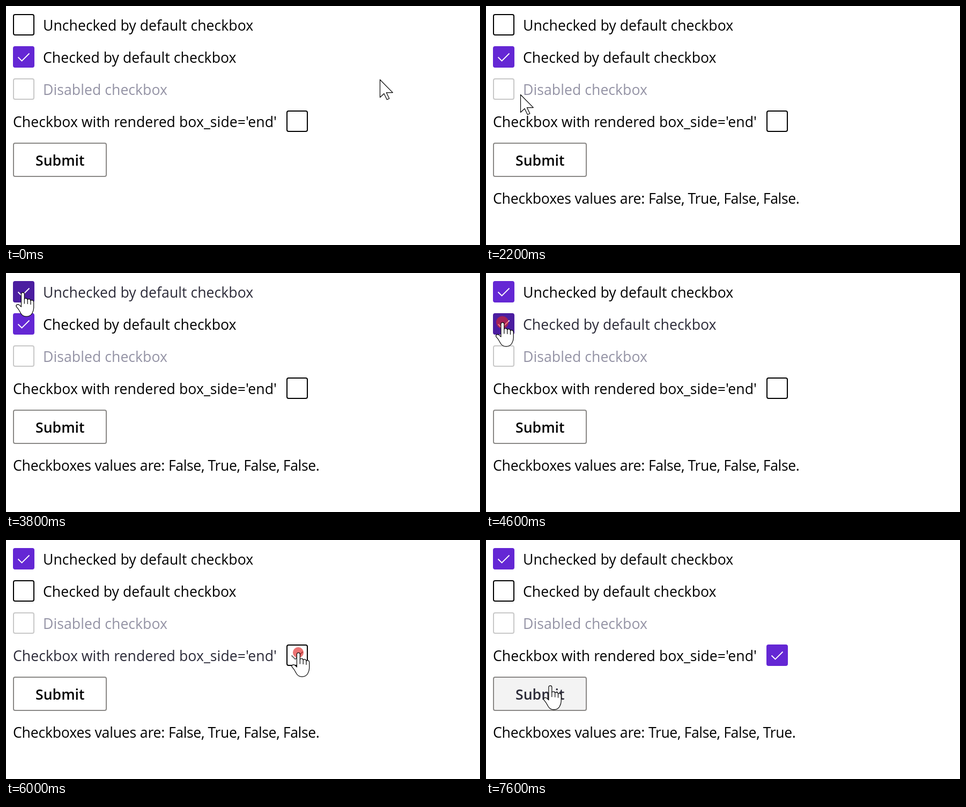
An HTML page for the animation above (8000 ms loop, 884 by 446 pixels).

```html
<!DOCTYPE html>
<html lang="en">
<head>
<meta charset="utf-8">
<title>Checkbox form</title>
<style>
  html, body { margin: 0; width: 100%; height: 100%; overflow: hidden; background: #fff; }
  svg { display: block; width: 884px; height: 446px; }
  text { font: 400 26.6px "Open Sans", "Noto Sans", sans-serif; letter-spacing: .06px; white-space: pre; }
  .box { fill: #fff; stroke: #000; stroke-width: 2; }
  .tick { fill: none; stroke: #fff; stroke-width: 1.8; visibility: hidden; }
  .on .box { fill: #6427d4; stroke: #6427d4; }
  .on .tick, .hover .tick { visibility: visible; }
  .hover .tick { stroke: #666; }
  .hover text { fill: #2b2a38; }
  .on.hover .box { fill: #4b1da0; stroke: #4b1da0; }
  .on.hover .tick { stroke: #fff; }
  .disabled .box { stroke: #c8c8c8; }
  .disabled text { fill: #9493a5; }
  #submit rect { fill: #fff; stroke: #8a8886; stroke-width: 2; }
  #submit text { font-weight: 600; letter-spacing: 0; text-anchor: middle; }
  #submit.hover rect { fill: #f3f3f3; }
  #submit.press text { fill: #000; }
  #result { letter-spacing: -.18px; }
  #values { letter-spacing: -.38px; }
  #ripple { fill: #e02424; }
  #arrow, #hand { fill: #fff; stroke: #000; stroke-width: 1.2; stroke-linejoin: round; }
</style>
</head>
<body>
<svg viewBox="0 0 884 446">
  <g class="row"><text>Unchecked by default checkbox</text></g>
  <g class="row"><text>Checked by default checkbox</text></g>
  <g class="row disabled"><text>Disabled checkbox</text></g>
  <g class="row end"><text>Checkbox with rendered box_side='end'</text></g>
  <g id="submit">
    <rect x="14" y="256" width="173" height="62" rx="3"/>
    <text x="100.8" y="298">Submit</text>
  </g>
  <text id="result" x="13" y="369">Checkboxes values are: <tspan id="values"></tspan></text>
  <circle id="ripple"/>
  <path id="arrow" d="M.5.5V33.5L8 26.5 13.5 37.8 17.8 35.8 12.4 24.6H24.3Z"/>
  <g id="hand">
    <path d="M-2.6 27V3.2C-2.6-.6 3.3-.6 3.3 3.2V13C4.5 10.3 9 10.8 9.2 14
             10.6 11.7 14.7 12.2 15 15.6 16.8 13.8 20.7 14.6 20.7 18.4V29
             C20.7 34 19 37 17.6 39.5 14.8 44 11.5 45.2 7 45.2 2 45.2 -1 43 -3.2 39.5
             L-6.8 33.2C-8.2 30.6 -10 29 -11.4 27.2 -13.6 23.8 -9.5 21.4 -6.4 23.6Z"/>
    <path fill="none" d="M3.3 13V21.5M9.2 14V22M15 15.6V23"/>
  </g>
</svg>
<script>
const LOOP = 8000, STEP = 200;    // the picture updates five times a second
const ROW = 60, LEFT = 13, TOP = 15;
const RESPONSE = 325;             // delay from a click to its effect
const SPREAD = .0575, MAX = 25;   // ripple growth per ms, largest radius

const $ = id => document.getElementById(id);
const rows = [...document.querySelectorAll('.row')];
const submit = $('submit');
const targets = [...rows.filter(row => !row.classList.contains('disabled')), submit];

const START = { x: 697, y: 137 };
const moves = [
  { from: 0, to: 800, x: 122.5, y: 283.5 },
  { from: 2000, to: 2200, x: 64, y: 165 },
  { from: 2200, to: 2600, x: 31, y: 36 },
  { from: 3800, to: 4400, x: 30.5, y: 92 },
  { from: 4800, to: 5400, x: 545, y: 210 },
  { from: 6400, to: 7000, x: 119.5, y: 271.5 }
];
const clicks = [
  { at: 1275, on: submit },
  { at: 3270, on: rows[0] },
  { at: 4400, on: rows[1] },
  { at: 5825, on: rows[3] },
  { at: 7075, on: submit }
];

rows.forEach((row, i) => {
  const y = TOP + i * ROW, end = row.classList.contains('end');
  row.firstChild.setAttribute('x', end ? LEFT : LEFT + 56);
  row.firstChild.setAttribute('y', y + 31);
  row.insertAdjacentHTML('beforeend', `
    <g transform="translate(${end ? 523 : LEFT} ${y})">
      <rect class="box" x="1" y="1" width="38" height="38" rx="3"/>
      <path class="tick" d="M9.5 20.5l7 7 14-14"/>
    </g>`);
});

function cursorAt(t) {
  let { x, y } = START;
  for (const m of moves) {
    const u = Math.min(1, Math.max(0, (t - m.from) / (m.to - m.from)));
    const k = u * u * (3 - 2 * u);
    x += (m.x - x) * k;
    y += (m.y - y) * k;
  }
  return { x, y };
}

// replays the clicks that have taken effect by time t
function formAt(t) {
  const checked = rows.map((row, i) => i === 1);
  let values = null;
  for (const c of clicks) {
    if (t < c.at + RESPONSE) break;
    const i = rows.indexOf(c.on);
    if (i >= 0) checked[i] = !checked[i];
    else values = checked.map(v => v ? 'True' : 'False').join(', ') + '.';
  }
  return { checked, values };
}

function contains(el, { x, y }) {
  const b = el.getBBox();
  return x >= b.x && x <= b.x + b.width && y >= b.y && y <= b.y + b.height;
}

function render(t) {
  const cursor = cursorAt(t), { checked, values } = formAt(t);
  const over = targets.find(el => contains(el, cursor));
  const click = clicks.find(c => t > c.at && (t - c.at) * SPREAD < MAX);

  targets.forEach(el => el.classList.toggle('hover', el === over));
  rows.forEach((row, i) => row.classList.toggle('on', checked[i]));
  submit.classList.toggle('press', click?.on === submit);
  $('result').style.visibility = values ? 'visible' : 'hidden';
  $('values').textContent = values ?? '';

  const r = click ? (t - click.at) * SPREAD : 0;
  $('ripple').setAttribute('r', r);
  $('ripple').setAttribute('opacity', 1 - r / 28);

  for (const id of ['ripple', 'arrow', 'hand'])
    $(id).setAttribute('transform', `translate(${cursor.x} ${cursor.y})`);
  $('arrow').style.display = over ? 'none' : '';
  $('hand').style.display = over ? '' : 'none';
}

let shown = -1;
function tick() {
  const t = Math.floor(performance.now() % LOOP / STEP) * STEP;
  if (t !== shown) render(shown = t);
  requestAnimationFrame(tick);
}
tick();
</script>
</body>
</html>
```
